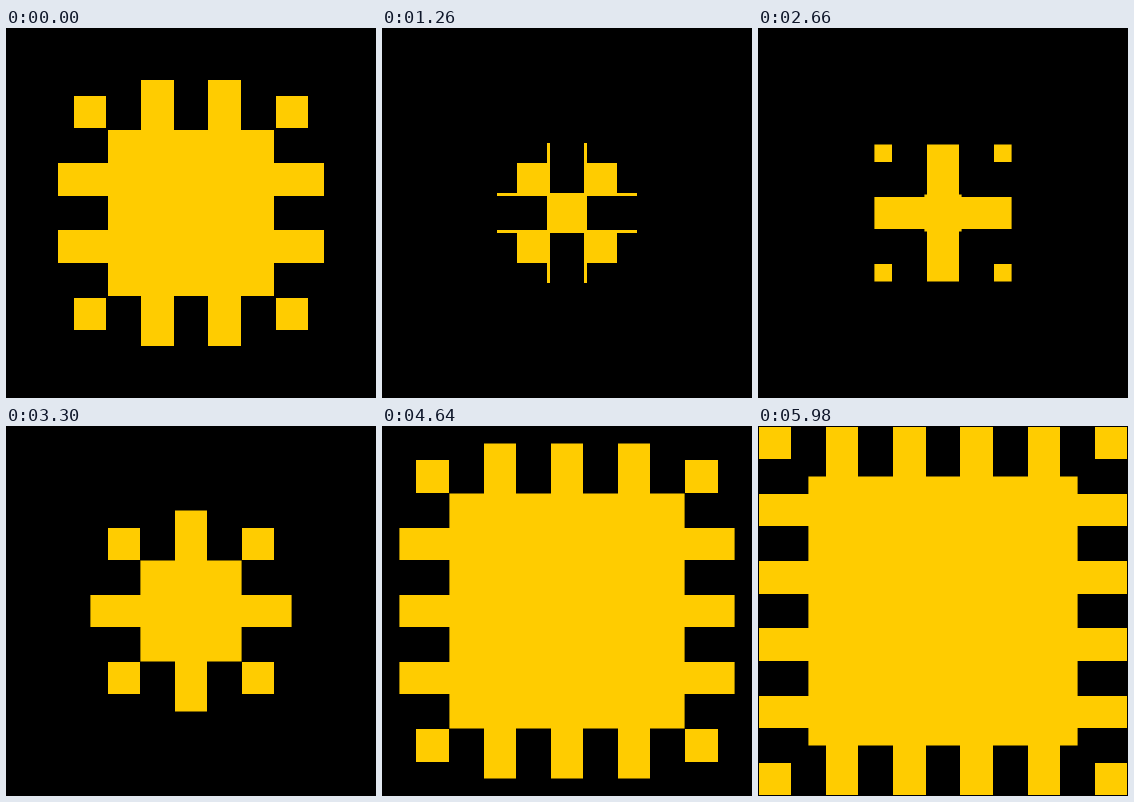
Animation, 370 px wide and 370 px high, one loop 6000 ms. Source, as an HTML page with a canvas:

```html
<!DOCTYPE html>
<html lang="en">
<head>
<meta charset="utf-8">
<title>Woven strips</title>
<style>
  html, body { margin: 0; width: 100%; height: 100%; overflow: hidden; background: #000; }
  canvas { display: block; }
</style>
</head>
<body>
<canvas id="stage" width="370" height="370"></canvas>
<script>
const SIZE = 370, MID = SIZE / 2, COUNT = 11, INSET = 0.15;
const STEP = 20, LOOP = 6000;
const ctx = document.getElementById('stage').getContext('2d');

// Half-length of a strip: shrinks, bounces near the centre, grows, shrinks again.
function reach(n, delay) {
  const k = n + delay;
  return Math.min(MID, Math.max(133 - k, k - 114.4), 483.6 - k);
}

// Strips of alternating length, joined by a block as long as the shorter ones.
function strips(even, odd, vertical) {
  const path = new Path2D();
  const add = (from, to, half) => {
    if (vertical) path.rect(from, MID - half, to - from, half * 2);
    else path.rect(MID - half, from, half * 2, to - from);
  };
  for (let i = 0; i < COUNT; i++) {
    const from = Math.ceil(i * SIZE / COUNT + INSET);
    const to = Math.floor((i + 1) * SIZE / COUNT - INSET);
    add(from, to, i % 2 ? odd : even);
  }
  add(1, SIZE - 1, Math.min(even, odd));
  return path;
}

function draw(ms) {
  const n = Math.floor((ms % LOOP) / STEP);
  const even = reach(n, 0), odd = reach(n, 50);
  ctx.fillStyle = '#000';
  ctx.fillRect(0, 0, SIZE, SIZE);
  ctx.save();
  ctx.clip(strips(even, odd, true));
  ctx.fillStyle = '#fc0';
  ctx.fill(strips(even, odd, false));
  ctx.restore();
}

const start = performance.now();
function tick() {
  draw(performance.now() - start);
  requestAnimationFrame(tick);
}
tick();
</script>
</body>
</html>
```
